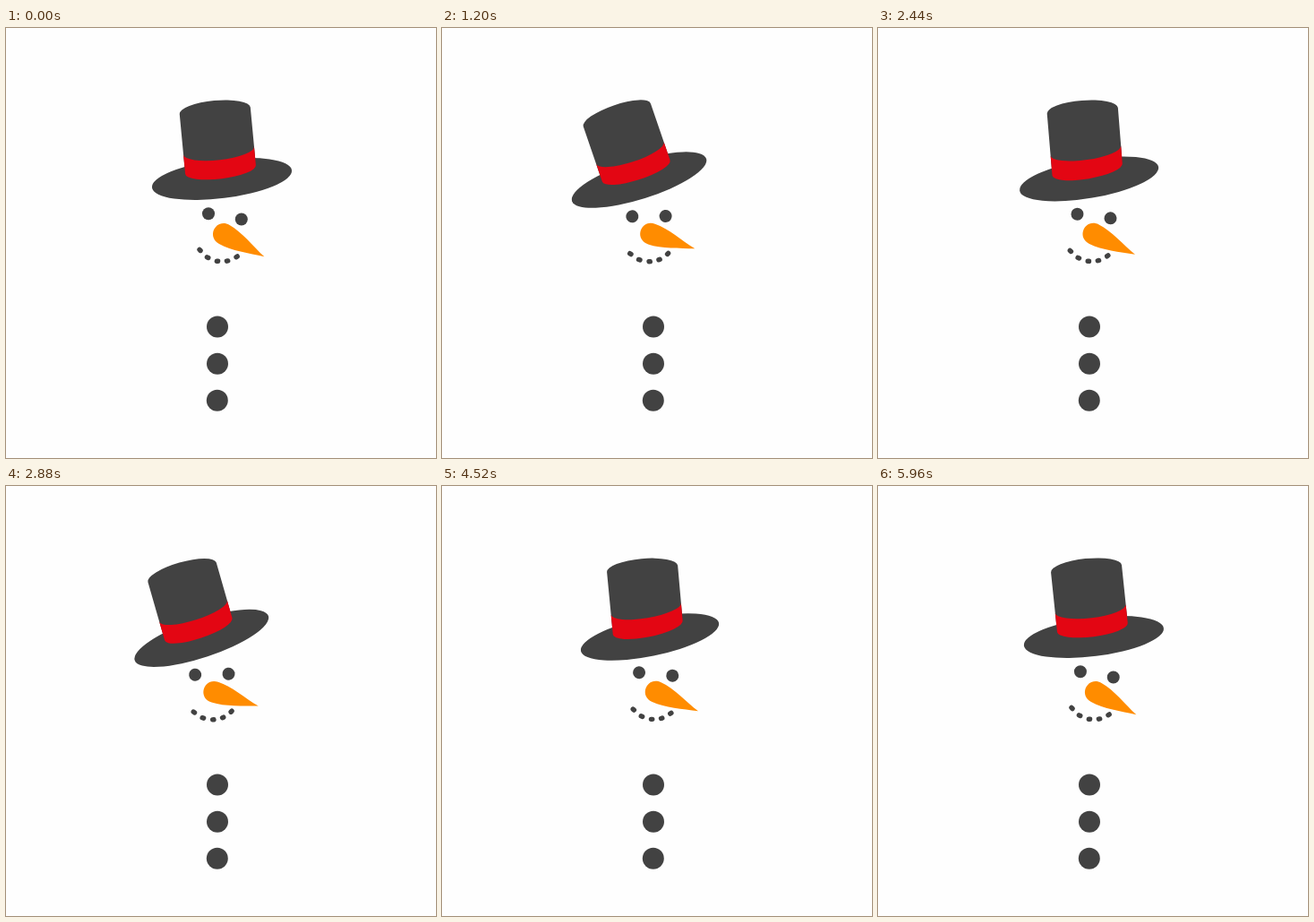
An HTML page that plays this animation: 480x480 px, repeating every 6000 ms.

```html
<!DOCTYPE html>
<html lang="en">
<head>
<meta charset="utf-8">
<title>Snowman</title>
<style>
html, body { margin: 0; width: 100%; height: 100%; overflow: hidden; background: #fefefe; }
svg { display: block; width: 100%; height: 100%; }
.coal { fill: #424242; }
</style>
</head>
<body>
<svg viewBox="0 0 480 480">
  <g class="coal">
    <circle cx="236" cy="333.5" r="12"/>
    <circle cx="236" cy="374.7" r="12"/>
    <circle cx="235.8" cy="415.7" r="12"/>
  </g>
  <g id="head">
    <g class="coal">
      <circle cx="226" cy="207.2" r="7"/>
      <circle cx="262.8" cy="213.5" r="7"/>
    </g>
    <path d="M216 247.4l1.1 1.1M224.4 255.8l1.4.7M235.3 260.2l1.3.1M246.4 260.2l1.3-.3M257 255.7l1.2-.8"
      stroke="#424242" stroke-width="5.4" stroke-linecap="round"/>
    <path fill="#ff8c00" transform="translate(242 229.5) rotate(29)"
      d="M53 0C36-4 18-12 2-12C-15-12-15 12 2 12C18 12 36 5 53 0Z"/>
    <ellipse class="coal" rx="78.6" ry="21.5" transform="translate(241 168.5) rotate(-7.1)"/>
    <g transform="translate(239.5 158) rotate(-7.1)">
      <path id="crown" class="coal"/>
      <path id="band" fill="#e30613"/>
    </g>
  </g>
</svg>
<script>
const PERIOD = 2000, STEP = 40;
const SWING = 11.5, BRIM_TILT = 7.1;
const HALF = 39.7, HEIGHT = 66;
const $ = id => document.getElementById(id);

// Cubic Bezier easing with end heights 0 and 1
const ease = (x1, x2) => x => {
  let lo = 0, hi = 1, s = 0.5;
  for (let i = 0; i < 24; i++) {
    s = (lo + hi) / 2;
    const at = 3 * (1 - s) * (1 - s) * s * x1 + 3 * (1 - s) * s * s * x2 + s ** 3;
    if (at < x) lo = s; else hi = s;
  }
  return s * s * (3 - 2 * s);
};

// 0 to 1 during the first part of the period, then back
const sway = (t, turn, out, back) =>
  t < turn ? out(t / turn) : 1 - back((t - turn) / (PERIOD - turn));

const headOut = ease(.72, .45), headBack = ease(.36, .65);
const crownOut = ease(.76, .4), crownBack = ease(.45, .55);

function draw(time) {
  const t = Math.floor(time / STEP) * STEP % PERIOD;
  const turn = SWING * sway(t, 1000, headOut, headBack);
  $('head').setAttribute('transform', `rotate(${-turn} 236.5 284)`);

  // The crown's top follows the head with a delay
  const tilt = 4.1 + 14.8 * sway((t + PERIOD - 220) % PERIOD, 980, crownOut, crownBack);
  const lean = BRIM_TILT + turn - tilt;
  const a = lean * Math.PI / 180, c = Math.cos(a), s = Math.sin(a);
  const top = x => [x * c + HEIGHT * s, x * s - HEIGHT * c];
  const side = (x, k) => {
    const [u, v] = top(x);
    return [x + (u - x) * k, v * k];
  };
  const base = `M${-HALF} 0A${HALF} 10.3 0 0 0 ${HALF} 0L`;
  $('crown').setAttribute('d', `${base}${top(HALF)}A${HALF} 11.3 ${lean} 0 0 ${top(-HALF)}Z`);
  $('band').setAttribute('d', `${base}${side(HALF, .32)}A39 10.1 ${lean * .32} 0 1 ${side(-HALF, .32)}Z`);
}

const start = performance.now();
function loop() {
  draw(performance.now() - start);
  requestAnimationFrame(loop);
}
loop();
</script>
</body>
</html>
```
